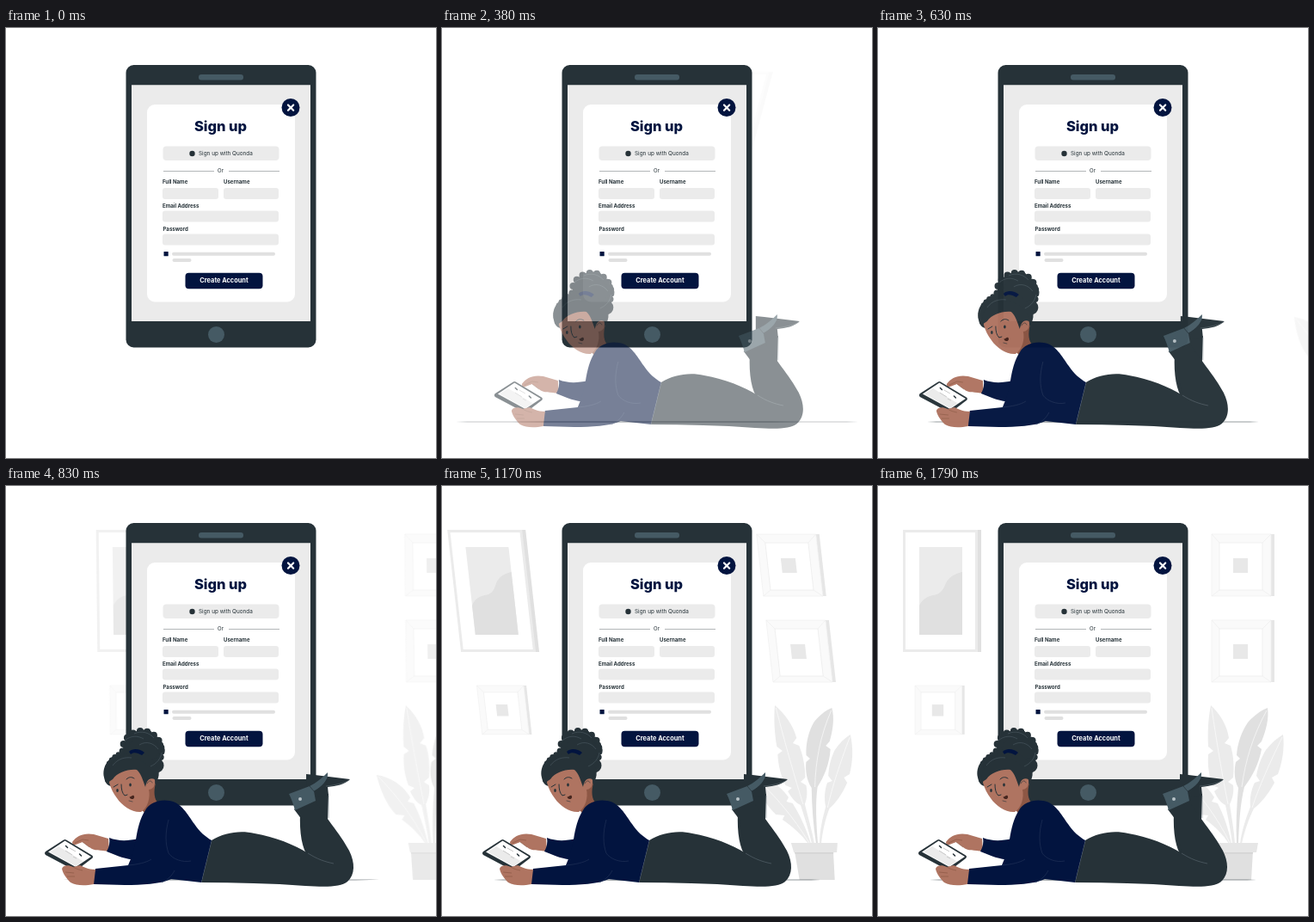
Recreate the animation shown at these times as an HTML page. Size 500 by 500 pixels, loop 1.83 s.

```html
<!DOCTYPE html>
<html lang="en">
<head>
<meta charset="utf-8">
<title>Sign up</title>
<style>
html, body { margin: 0; width: 100%; height: 100%; overflow: hidden; background: #fff; }
svg { display: block; width: 100vw; height: 100vh; }
text { font-family: Inter, "Open Sans", sans-serif; fill: #263238; }
.bold { font-weight: 700; font-size: 6.1px; }
.navy { fill: #02143f; }
.dark { fill: #263238; }
.slate { fill: #455a64; }
.skin { fill: #af7461; }
.g1 { fill: #ebebeb; }
.g2 { fill: #e0e0e0; }
.line { fill: none; stroke: #263238; stroke-linecap: round; }
</style>
</head>
<body>
<svg viewBox="0 0 500 500">
  <defs>
    <g id="frame">
      <path fill="#e6e6e6" d="M69 0h4v72h-4z"/>
      <path fill="#fafafa" stroke="#f0f0f0" stroke-width=".7" d="M0 0H69V72H0Z"/>
      <path fill="none" stroke="#ebebeb" stroke-width=".6" d="M0 0 9 10M69 0 59 10M0 72 9 65M69 72 59 65"/>
      <path fill="#fff" stroke="#ebebeb" stroke-width=".7" d="M9 10H59V65H9Z"/>
      <path fill="#e8e8e8" d="M25 28h17v17h-17z"/>
    </g>
  </defs>

  <g id="decor">
    <path class="g2" d="M115 51h5v142h-5z"/>
    <path fill="#fff" stroke="#ebebeb" stroke-width="3" d="M30.5 52.5H114.5V191.5H30.5Z"/>
    <path class="g1" d="M48 71h50v102h-50z"/>
    <path class="g2" d="M48 139C52 131 58 128 64 127C72 126 75 122 78 115C82 105 90 102 98 100V173H48Z"/>
    <use href="#frame" x="388" y="56"/>
    <use href="#frame" x="388" y="156"/>
    <use href="#frame" transform="translate(43 232) scale(.79)"/>

    <path class="g1" d="M352 336C368 338 383 348 391 362L388 367 395 369C401 381 407 396 411 416H408C401 405 392 396 381 388L384 383 374 382C363 370 356 353 352 336Z"/>
    <path class="g2" d="M453 258C455 270 451 285 446 297L441 302 446 306C443 323 435 338 426 350C421 370 420 392 419 416H417C416 394 417 372 419 351C414 342 414 330 416 321L421 317 417 313C418 299 423 285 430 275C437 267 445 261 453 258Z"/>
    <path class="g1" d="M471 289C473 305 470 322 465 335L458 339 461 345C454 358 446 368 437 375C431 387 426 402 423 416H421C423 400 428 386 433 373C432 363 434 353 438 345L444 343 440 337C442 325 446 315 451 307C457 299 464 293 471 289Z"/>
    <path class="g1" d="M387 255C398 265 406 279 408 293L403 299 410 302C414 315 414 329 413 339L407 344 413 348C414 357 412 364 409 370C411 385 414 400 415 416H412C410 400 407 385 404 371C398 368 394 362 391 355L396 351 389 348C385 337 383 325 384 312L390 308 384 303C383 287 384 270 387 255Z"/>
    <path fill="none" stroke="#fff" stroke-width=".6" d="M388 258C394 300 401 340 407 370M452 261C436 290 427 320 423 350M470 292C455 323 443 350 435 374M354 338C375 359 395 386 409 415"/>
    <path class="g2" d="M391 424H436L434 458H393Z"/>
    <path fill="#e6e6e6" d="M388 415H442L440 426H390Z"/>
    <path fill="#d4d4d4" d="M391 426H436V427.500H391Z"/>
  </g>

  <ellipse id="floor" class="dark" cx="250" cy="458" rx="194" ry=".4"/>

  <g id="device">
    <rect class="dark" x="139.500" y="43" width="221" height="328.500" rx="9"/>
    <path class="g1" d="M146 66.300H354V341H146Z"/>
    <rect class="slate" x="224" y="54" width="52" height="6.500" rx="3"/>
    <circle class="slate" cx="244.500" cy="356.500" r="9.500"/>
    <rect x="164" y="89" width="172" height="229.500" rx="9" fill="#fff"/>
    <circle class="navy" cx="331" cy="92.500" r="10.500"/>
    <path d="M328 89.500 334.200 95.700M334.200 89.500 328 95.700" stroke="#fff" stroke-width="2.200" stroke-linecap="round"/>
    <text x="249.500" y="119.500" text-anchor="middle" font-size="16.500" style="font-weight:800;fill:#02143f">Sign up</text>
    <g class="g1">
      <rect x="182.500" y="137.500" width="135" height="16.500" rx="4"/>
      <rect x="182" y="186" width="65" height="13" rx="3"/>
      <rect x="253" y="186" width="64" height="13" rx="3"/>
      <rect x="182" y="212.500" width="135" height="13" rx="3"/>
      <rect x="182" y="239.500" width="135" height="13" rx="3"/>
    </g>
    <circle class="dark" cx="216.500" cy="146" r="3.200"/>
    <text x="224" y="148" font-size="6.400">Sign up with Quonda</text>
    <path d="M183 166.500H242M259 166.500H318" stroke="#a0a4a6" stroke-width=".8"/>
    <text x="249.500" y="168" font-size="6" text-anchor="middle">Or</text>
    <text class="bold" x="182" y="181.300">Full Name</text>
    <text class="bold" x="253" y="181.300">Username</text>
    <text class="bold" x="182" y="208.800">Email Address</text>
    <text class="bold" x="182.500" y="235.800">Password</text>
    <rect class="navy" x="183.500" y="260" width="5.200" height="5.200" rx=".5"/>
    <rect class="g2" x="193" y="260.700" width="120" height="4" rx="2"/>
    <rect class="g2" x="193.500" y="268" width="22" height="4" rx="2"/>
    <rect class="navy" x="208.500" y="284.800" width="90" height="18.500" rx="4"/>
    <text class="bold" x="253.500" y="296.200" text-anchor="middle" style="font-size:7.400px;fill:#fff">Create Account</text>
  </g>

  <g id="woman">
    <!-- far leg and shoe -->
    <path class="dark" d="M347 362 377 358 376 388C374 405 378 420 384 435L354 432C346 422 343 403 344 380Z"/>
    <path class="dark" d="M351 335 361 336 402 341C396 347 386 349 376 350L377 360 351 363Z"/>
    <path fill="none" stroke="#647279" stroke-width=".5" d="M374 349C384 348 394 346 401 342M377 360V386"/>
    <!-- near leg -->
    <path class="dark" d="M241 412C256 403 274 400 291 404C315 408 337 417 353 427L346 388 337 376 361 365C370 381 391 405 401 424C408 438 408 452 399 460C391 467 371 466 350 465C310 462 270 461 229 461Z"/>
    <path fill="none" stroke="#5d6b72" stroke-width=".6" d="M337 376 361 365M353 427C364 434 373 437 383 439M241 412 229 461"/>
    <path class="slate" d="M331 358 355 349C363 345 370 339 376 333C377 342 370 349 360 355L362 366 338 377C336 370 334 364 331 358Z"/>
    <path fill="none" stroke="#263238" stroke-width=".7" d="M355 349 360 355C366 352 372 347 375 341"/>
    <circle cx="344" cy="364" r="2" fill="#b8c2c7"/>

    <!-- far arm -->
    <path class="skin" d="M79 414C84 407 92 403 104 405L121 410 122 425C112 423 104 425 99 420L91 414 83 417C80 418 79 416 79 414Z"/>
    <path fill="none" stroke="#865441" stroke-width=".6" d="M82 415 91 411 98 412M91 414 99 420"/>
    <path class="navy" d="M122 409C132 413 143 413 156 410L157 434C147 436 133 431 119 425C122 420 123 414 122 409Z"/>

    <!-- neck, hair and face -->
    <path fill="#8d5745" d="M158 350 177 341C174 352 173 361 178 368L164 381 154 371Z"/>
    <ellipse class="dark" cx="160" cy="307" rx="22" ry="23"/>
    <ellipse class="line" cx="160" cy="307" rx="22.500" ry="22" stroke-width="8" stroke-dasharray="0 8.500"/>
    <ellipse class="line" cx="162" cy="309" rx="21" ry="22" stroke-width="7" stroke-dasharray="0 6.300"/>
    <circle class="dark" cx="177" cy="325" r="8.500"/>
    <path class="dark" d="M116 339C113 326 122 314 137 309C153 303 174 313 179 329C182 340 175 349 168 352L124 349C119 348 117 344 116 339Z"/>
    <path class="line" stroke-width="6" stroke-dasharray="0 5" d="M120 342C115 326 126 312 142 309"/>
    <path class="skin" d="M122 345C122 336 129 329 141 326C151 324 159 330 162 338C166 337 173 336 175 342C176 349 172 353 168 353C170 362 167 374 159 379C149 380 137 372 131 363C127 358 124 352 122 345Z"/>
    <path class="dark" d="M120 345C119 330 127 318 147 317C160 318 174 326 175 341C168 338 165 344 164 350C161 342 159 334 154 330C143 329 132 333 126 341Z"/>
    <path class="navy" d="M145 309C150 304 158 306 163 310L160 313C155 310 150 309 147 312Z"/>
    <path fill="none" stroke="#5f6e76" stroke-width=".4" d="M140 296C147 290 155 290 162 294M157 301C165 296 174 299 179 306M151 288C160 284 169 287 174 293M170 326C177 323 182 317 183 310M126 325C132 317 140 315 148 316"/>
    <path class="line" stroke-width="1" d="M127 350 132 347M142 341C145 338 148 338 151 340M136 347C136 353 137 357 140 360L143 359"/>
    <path class="line" stroke-width=".6" d="M166 346C168 342 171 342 172 345M145 366 149 367"/>
    <ellipse class="dark" cx="131.500" cy="354" rx="1.300" ry="1.900"/>
    <ellipse class="dark" cx="146.500" cy="347.500" rx="1.300" ry="1.900"/>
    <path fill="#46261f" d="M145.500 361.500C148 361.500 149 359 150.500 360C152 362 150.500 364 149 364C147 364.500 146 363 145.500 361.500Z"/>

    <!-- torso and near arm -->
    <path class="navy" d="M164 377C169 368 181 364 192 366C206 368 213 382 221 393C227 402 234 408 241 412L229 461 194 457C181 463 160 464 140 464L104 463C103 457 104 450 106 445L144 441C148 432 151 422 153 411C155 398 158 386 164 377Z"/>
    <path fill="none" stroke="#26365c" stroke-width=".6" d="M191 388C187 403 187 416 191 427C196 434 207 438 217 436M144 441C155 440 165 438 171 434M183 461C190 458 195 453 198 447"/>

    <!-- handheld -->
    <path class="dark" d="M48 425 69 411.500Q70.500 410.500 72 411.500L102 429.500Q104 431 102 433L85 446Q83 447.500 80 446L48 429Q46 427 48 425Z"/>
    <path fill="#fff" d="M51 425.500 70.500 412.500 101 431 83 443Z"/>
    <path class="g1" d="M53 425.500 63 419 92 436.500 83 442Z"/>
    <path class="line" stroke-width="1.500" d="M71.500 418.500 73.500 420.500M87.500 428 89.500 430"/>
    <path stroke="#bbb" stroke-width=".8" d="M71 424 79 429M76 421 83 425M80 431 84 433"/>
    <path class="skin" d="M67 445C68 441 74 440 80 443L88 441C93 443 97 446 106 446L104 463C94 465 84 465 77 461C73 457 68 451 67 445Z"/>
    <path fill="none" stroke="#865441" stroke-width=".6" d="M71 449 81 450M73 454 82 454M80 443C85 446 87 446 91 447"/>
  </g>
</svg>
<script>
const [decor, floor, woman] = ["decor", "floor", "woman"].map(id => document.getElementById(id));
const LOOP = 1830;
const clamp = v => Math.min(1, Math.max(0, v));
const mix = (a, b, p) => a + (b - a) * p;
const span = (t, a, b) => clamp((t - a) / (b - a));

// cubic-bezier(.36, -.01, .5, 1.38), solved by bisection
function overshoot(x) {
  const curve = (s, a, b) => 3 * (1 - s) ** 2 * s * a + 3 * (1 - s) * s * s * b + s ** 3;
  let lo = 0, hi = 1;
  for (let i = 0; i < 24; i++) {
    const mid = (lo + hi) / 2;
    if (curve(mid, .36, .5) < x) lo = mid; else hi = mid;
  }
  return curve(lo, -.01, 1.38);
}

function draw(t) {
  const p = overshoot(span(t, -20, 980));
  const seen = t < 80 ? 0 : clamp(p);
  woman.setAttribute("transform", `translate(${30 * (1 - p)})`);
  woman.setAttribute("opacity", seen);
  floor.setAttribute("transform", `translate(250 458) scale(${mix(1.5, 1, p)}) translate(-250 -458)`);
  floor.setAttribute("opacity", seen);

  // the wall decor slides in leaning, swings past upright and settles
  const q = span(t, 125, 1050) ** 1.35;
  let skew = mix(-.364, .176, q);
  skew = mix(skew, -.035, span(t, 1050, 1448));
  skew = mix(skew, 0, span(t, 1448, 1740));
  decor.setAttribute("transform", `matrix(1 0 ${skew} 1 ${255 * (1 - q) - 255 * skew} 0)`);
  decor.setAttribute("opacity", q);
}

const start = performance.now();
function tick() {
  draw((performance.now() - start) % LOOP);
  requestAnimationFrame(tick);
}
draw(0);
requestAnimationFrame(tick);
</script>
</body>
</html>
```
